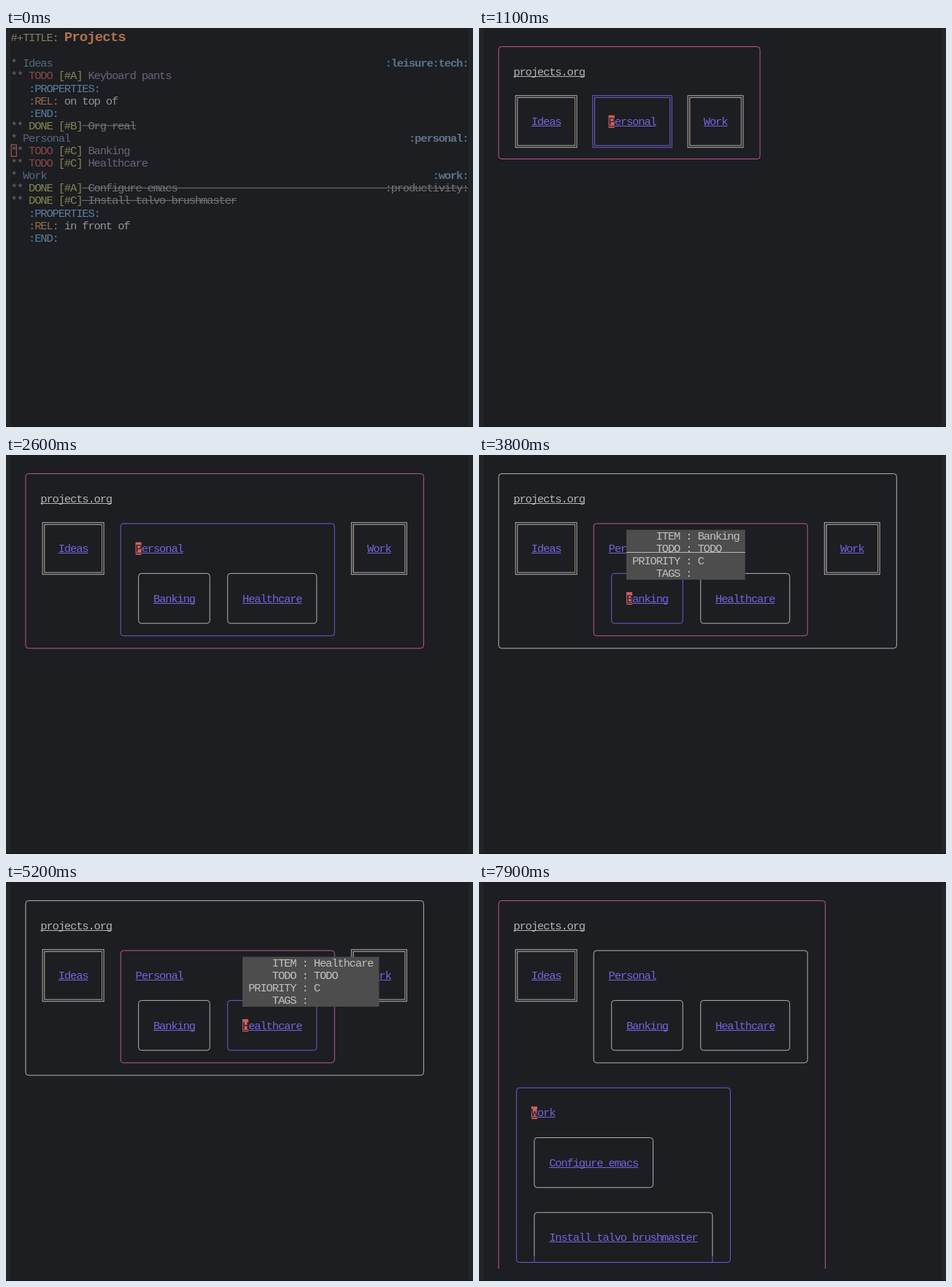
Animation, 640 px wide and 547 px high, one loop 8 s. Source, as an HTML page:

```html
<!DOCTYPE html>
<html lang="en">
<head>
<meta charset="utf-8">
<title>Projects outline</title>
<style>
  html, body { margin: 0; width: 100%; height: 100%; overflow: hidden; background: #1c1e22; }
  svg { display: block; width: 100vw; height: 100vh; }
  text {
    font: 15.5px "Liberation Mono", "Noto Sans Mono", monospace;
    letter-spacing: -0.0748em;
    white-space: pre;
  }
  .bold { font-weight: 700; }
  .title { font-size: 19px; font-weight: 700; letter-spacing: -0.0474em; }
</style>
</head>
<body>
<svg viewBox="0 0 640 547">
  <rect width="640" height="547" fill="#1c1e22"/>
  <rect width="6" height="547" fill="#222428"/>
  <rect x="634" width="6" height="547" fill="#222428"/>
  <rect y="546" width="640" height="1" fill="#131517"/>
  <g id="scene"></g>
</svg>
<script>
const LOOP = 8000;
const CW = 8.14, RH = 17.1, LEFT = 6.6;
const BG = '#1c1e22', FG = '#b4b6b4', LINE = '#b2b4b1', TINT = '#96836a';
const LINK = '#7563dc', BLUE = '#6f5fd2', PINK = '#c2588c', CURSOR = '#cc6060';

const colX = c => LEFT + c * CW;
const rowY = r => 8.5 + r * RH;
const midX = c => colX(c + 0.5);

const text = (c, y, s, fill, cls = '') =>
  `<text class="${cls}" x="${colX(c)}" y="${y + 5}" fill="${fill}">${s}</text>`;
const rect = (x, y, w, h, fill) =>
  `<rect x="${x}" y="${y}" width="${w}" height="${h}" fill="${fill}"/>`;
const path = (d, stroke) => `<path d="${d}" fill="none" stroke="${stroke}"/>`;
const frame = (x, y, x2, y2, stroke, r = 0) =>
  `<rect x="${x}" y="${y}" width="${x2 - x}" height="${y2 - y}" rx="${r}" fill="none" stroke="${stroke}"/>`;

// ---- outline document ----

const C = {
  key: '#a29a68', olive: '#a0a35e', todo: '#a85353', title: '#dc8758', one: '#6a7b8f',
  two: '#857690', tag: '#708aa5', drawer: '#6d98bd', prop: '#b3835a', done: '#8c8e8c', star: '#7d8086'
};
const docY = k => 48.3 + k * RH;

const section = (k, name, tags) =>
  text(0, docY(k), '*', C.star) + text(2, docY(k), name, C.one) +
  text(77 - tags.length, docY(k), tags, C.tag, 'bold');

function entry(k, state, priority, name, tags = '') {
  const y = docY(k), done = state === 'DONE', ink = done ? C.done : C.two;
  let out = text(0, y, '**', C.star) + text(3, y, state, done ? C.olive : C.todo) +
    text(8, y, `[#${priority}]`, C.olive) + text(13, y, name, ink);
  if (tags) out += text(77 - tags.length, y, tags, ink);
  if (done) out += path(`M${colX(12)} ${y}H${colX(tags ? 77 : 13 + name.length)}`, C.done);
  return out;
}

const drawer = (k, rel) =>
  text(3, docY(k), ':PROPERTIES:', C.drawer) + text(3, docY(k + 1), ':REL:', C.prop) +
  text(9, docY(k + 1), rel, FG) + text(3, docY(k + 2), ':END:', C.drawer);

function outline(focused) {
  const y = docY(7), top = y - RH / 2;
  const body = text(0, 13, '#+TITLE:', C.key) + text(9, 13, 'Projects', C.title, 'title') +
    section(0, 'Ideas', ':leisure:tech:') +
    entry(1, 'TODO', 'A', 'Keyboard pants') + drawer(2, 'on top of') +
    entry(5, 'DONE', 'B', 'Org real') +
    section(6, 'Personal', ':personal:') +
    entry(7, 'TODO', 'C', 'Banking') + entry(8, 'TODO', 'C', 'Healthcare') +
    section(9, 'Work', ':work:') +
    entry(10, 'DONE', 'A', 'Configure emacs', ':productivity:') +
    entry(11, 'DONE', 'C', 'Install talvo brushmaster') + drawer(12, 'in front of');
  const cursor = focused
    ? rect(LEFT, top, CW, RH, CURSOR) + text(0, y, '*', BG)
    : frame(LEFT + 0.5, top + 0.5, LEFT + CW - 0.5, top + RH - 0.5, CURSOR);
  return `<g opacity="${focused ? 1 : 0.78}">${body}</g>${cursor}`;
}

// ---- box diagram ----

function label(c, r, s, fill, selected) {
  const y = rowY(r), line = Math.round(y + 6);
  let out = text(c, y, s, fill) + rect(colX(c), line, s.length * CW, 1, fill);
  if (selected) {
    out += rect(colX(c), y - RH / 2, CW, RH, CURSOR) + text(c, y, s[0], BG) +
      rect(colX(c), line, CW, 1, BG);
  }
  return out;
}

const single = (c, r, c2, r2, stroke) => frame(midX(c), rowY(r), midX(c2), rowY(r2), stroke, 4);

function double(c, r, c2, r2, stroke) {
  const x = midX(c), y = rowY(r), x2 = midX(c2), y2 = rowY(r2), gap = 1.3;
  const ring = d => frame(x - d, y - d, x2 + d, y2 + d, stroke);
  const sides = `M${x + gap} ${y + gap}V${y2 - gap}M${x2 - gap} ${y + gap}V${y2 - gap}`;
  return ring(gap) + ring(-gap) + (stroke === LINE ? path(sides, TINT) : '');
}

// A box that hugs its one-line label.
function node(c, r, name, selected, shape = single) {
  return shape(c, r, c + name.length + 5, r + 4, selected ? BLUE : LINE) +
    label(c + 3, r + 2, name, LINK, selected);
}

// A box whose bottom edge is out of view.
function openBox(c, r, c2, bottom, stroke) {
  const x = midX(c), x2 = midX(c2), y = rowY(r);
  return path(`M${x} ${bottom}V${y + 4}q0 -4 4 -4H${x2 - 4}q4 0 4 4V${bottom}`, stroke);
}

const file = () => label(5, 3, 'projects.org', FG);
const ideas = () => node(5, 5, 'Ideas', false, double);

function personal(stroke, at) {
  return single(18, 5, 54, 14, stroke) + label(21, 7, 'Personal', LINK, at === 'Personal') +
    node(21, 9, 'Banking', at === 'Banking') + node(36, 9, 'Healthcare', at === 'Healthcare');
}

function folded() {
  return single(2, 1, 46, 10, PINK) + file() + ideas() +
    node(18, 5, 'Personal', true, double) + node(34, 5, 'Work', false, double);
}

function opened(at) {
  const child = at === 'Banking' || at === 'Healthcare';
  const stroke = child ? PINK : at === 'Personal' ? BLUE : LINE;
  return single(2, 1, 69, 15, child ? LINE : PINK) + file() + ideas() +
    personal(stroke, at) + node(57, 5, 'Work', at === 'Work', double);
}

function workOpened() {
  const cut = rowY(29.5), end = rowY(30);
  return openBox(2, 1, 57, rowY(30.5), PINK) + file() + ideas() + personal(LINE) +
    single(5, 16, 41, 30, BLUE) + label(8, 18, 'Work', LINK, true) +
    node(8, 20, 'Configure emacs') +
    openBox(8, 26, 38, cut, LINE) +
    path(`M${midX(8)} ${cut}V${end}M${midX(38)} ${cut}V${end}`, BLUE) +
    label(11, 28, 'Install talvo brushmaster', LINK);
}

function tooltip(c, r, values) {
  const keys = ['ITEM', 'TODO', 'PRIORITY', 'TAGS'];
  const width = 13 + Math.max(...values.map(v => v.length));
  return rect(colX(c), rowY(r - 0.5), width * CW, 4 * RH, '#4d4d4d') +
    keys.map((k, i) => text(c + 9 - k.length, rowY(r + i), `${k} : ${values[i]}`, '#c0c0bc')).join('');
}

const bankingTip = () => tooltip(24, 6, ['Banking', 'TODO', 'C', '']) +
  rect(colX(24), 133, 20 * CW, 1, '#b8b8b6');

// ---- timeline: start time and picture ----

const scenes = [
  [0, () => outline(false)],
  [300, () => outline(true)],
  [1100, folded],
  [1600, () => folded() + tooltip(21, 2, ['Personal', '', 'B', ':personal:'])],
  [2600, () => opened('Personal')],
  [3100, () => opened('Banking')],
  [3600, () => opened('Banking') + bankingTip()],
  [4600, () => opened('Healthcare')],
  [5100, () => opened('Healthcare') + tooltip(39, 6, ['Healthcare', 'TODO', 'C', ''])],
  [7000, () => opened('Personal')],
  [7500, () => opened('Work')],
  [7800, workOpened]
];

const stage = document.getElementById('scene');
const start = performance.now();
let shown = null;

function draw(now) {
  const t = Math.max(0, now - start) % LOOP;
  const scene = scenes.filter(s => s[0] <= t).pop();
  if (scene !== shown) {
    stage.innerHTML = scene[1]();
    shown = scene;
  }
  requestAnimationFrame(draw);
}
draw(start);
</script>
</body>
</html>
```
